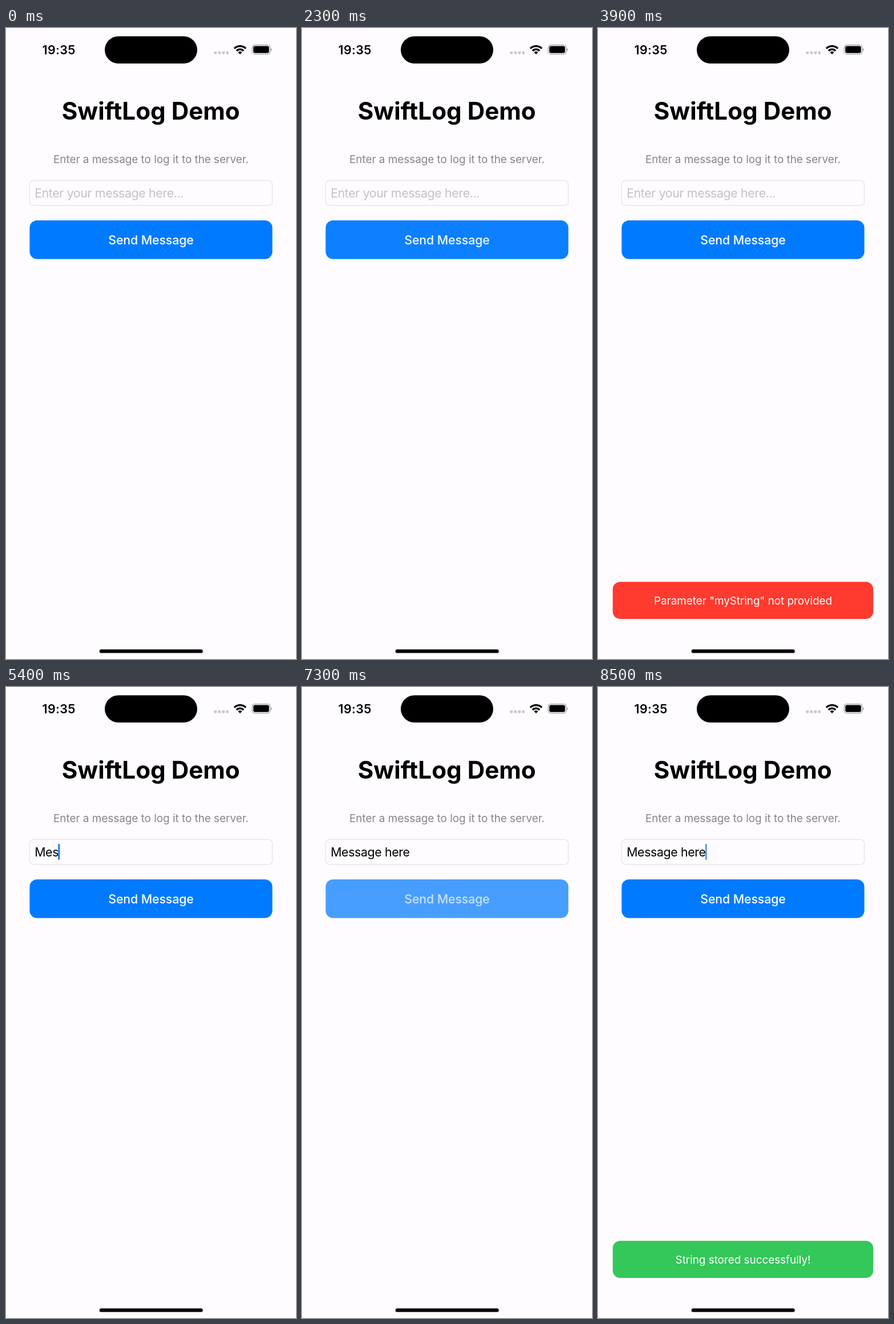
Animation, 508 px wide and 1102 px high, one loop 8.6 s. Source, as an HTML page:

```html
<!DOCTYPE html>
<html lang="en">
<head>
<meta charset="utf-8">
<title>SwiftLog Demo</title>
<style>
  html, body { margin: 0; width: 100%; height: 100%; overflow: hidden; background: #fefcff; }
  svg { display: block; width: 508px; height: 1102px; font-family: Inter, "Noto Sans", sans-serif; }
  text { white-space: pre; }
  .mid { text-anchor: middle; }
  .time { font-size: 21.5px; font-weight: 600; letter-spacing: .3px; }
  .title { font-size: 42.2px; font-weight: 700; }
  .small { font-size: 18.9px; letter-spacing: -.02px; }
  .input { font-size: 21.3px; letter-spacing: -.35px; }
  .label { font-size: 21.3px; font-weight: 550; letter-spacing: -.1px; }
</style>
</head>
<body>
<svg viewBox="0 0 508 1102">
  <defs><rect id="box" x="25.8" y="967.3" width="456.4" height="64.8" rx="13"/></defs>
  <rect width="508" height="1102" fill="#fefcff"/>

  <!-- status bar -->
  <text class="mid time" x="92.6" y="45.8">19:35</text>
  <rect x="173" y="14.5" width="162" height="47.5" rx="23.75"/>
  <path d="M364.5 43.3H390" stroke="#c8c6cb" stroke-width="4.6" stroke-dasharray="4.6 2.4"/>
  <g fill="none" stroke="#000" stroke-width="3.3">
    <path d="M399.9 35.9A14.3 14.3 0 0 1 420.1 35.9"/>
    <path d="M403.8 39.8A8.8 8.8 0 0 1 416.2 39.8"/>
  </g>
  <path d="M410 46L406.5 42.5A5 5 0 0 1 413.5 42.5Z"/>
  <rect x="431.2" y="29.6" width="31.6" height="16.2" rx="5" fill="none" stroke="#a09fa3" stroke-width="1.3"/>
  <rect x="433.2" y="31.6" width="27.6" height="12.2" rx="3.2"/>
  <path d="M464.2 35.2Q466 36 466 37.7T464.2 40.2Z" fill="#a09fa3"/>

  <!-- form -->
  <text class="mid title" x="253.7" y="160">SwiftLog Demo</text>
  <text class="mid small" x="254" y="235.6" fill="#86858a">Enter a message to log it to the server.</text>
  <rect x="41.5" y="266.3" width="425" height="43.6" rx="6.5" fill="none" stroke="#e4e2e6" stroke-width="1.2"/>
  <text id="hint" class="input" x="50.2" y="296.4" fill="#c4c2c7">Enter your message here...</text>
  <text id="typed" class="input" x="50.2" y="296.4"></text>
  <rect id="caret" y="274" width="2.6" height="28" rx="1.3" fill="#0d6bde"/>
  <g id="button">
    <rect x="41.4" y="336" width="425.2" height="67.5" rx="13" fill="#007aff"/>
    <text id="label" class="mid label" x="254" y="377.6" fill="#fff">Send Message</text>
  </g>

  <!-- toasts -->
  <g id="error">
    <use href="#box" fill="#ff3a2f"/>
    <text class="mid small" x="254" y="1006.6" fill="#fff">Parameter "myString" not provided</text>
  </g>
  <g id="success">
    <use href="#box" fill="#34c759"/>
    <text class="mid small" x="254" y="1006.6" fill="#fff">String stored successfully!</text>
  </g>

  <rect x="163.7" y="1085.2" width="181" height="6.4" rx="3.2"/>
</svg>
<script>
const LOOP = 8600, STEP = 100;
const MESSAGE = 'Message here';
const INPUT_X = 50.2;
const RELEASES = [2095, 7155];
const FOCUS = 4150, TYPE_START = 5100, TYPE_END = 6250;

const el = id => document.getElementById(id);
const ramp = (t, start, length) => Math.min(1, Math.max(0, (t - start) / length));
const easeInOut = p => p < .5 ? 2 * p * p : 1 - 2 * (1 - p) ** 2;
const setOpacity = (id, value) => el(id).setAttribute('opacity', value);

// Dims at once when pressed, then eases back after the release.
function buttonOpacity(t) {
  const release = RELEASES.find(r => t > r - 100 && t < r + 250);
  return release ? .2 + .8 * easeInOut(ramp(t, release, 250)) : 1;
}

const toastOpacity = (t, show, hide) => ramp(t, show, 150) - ramp(t, hide, 250);

// Each second the caret fades out and in again.
function blink(t) {
  const phase = t % 1000;
  return 1 - ramp(phase, 30, 170) + ramp(phase, 350, 200);
}

function caretOpacity(t) {
  if (t < FOCUS) return 0;
  if (t <= TYPE_START) return blink(t + 300);
  return t < TYPE_END ? 1 : blink(t);
}

// One letter per step, two per step after the fifth.
function typedCount(t) {
  const n = Math.max(0, Math.floor((t - TYPE_START) / STEP));
  return Math.min(MESSAGE.length, n + Math.max(0, n - 5));
}

function draw(t) {
  const press = buttonOpacity(t);
  setOpacity('button', press);
  setOpacity('label', press);
  setOpacity('error', toastOpacity(t, 2320, 4830));
  setOpacity('success', toastOpacity(t, 7520, LOOP));
  setOpacity('caret', caretOpacity(t));

  const count = typedCount(t);
  const typed = el('typed');
  typed.textContent = MESSAGE.slice(0, count);
  setOpacity('hint', count ? 0 : 1);
  el('caret').setAttribute('x', INPUT_X + (count ? typed.getComputedTextLength() - .6 : 0));
}

function tick() {
  const t = performance.now() % LOOP;
  draw(Math.floor(t / STEP) * STEP);
  requestAnimationFrame(tick);
}
tick();
</script>
</body>
</html>
```
